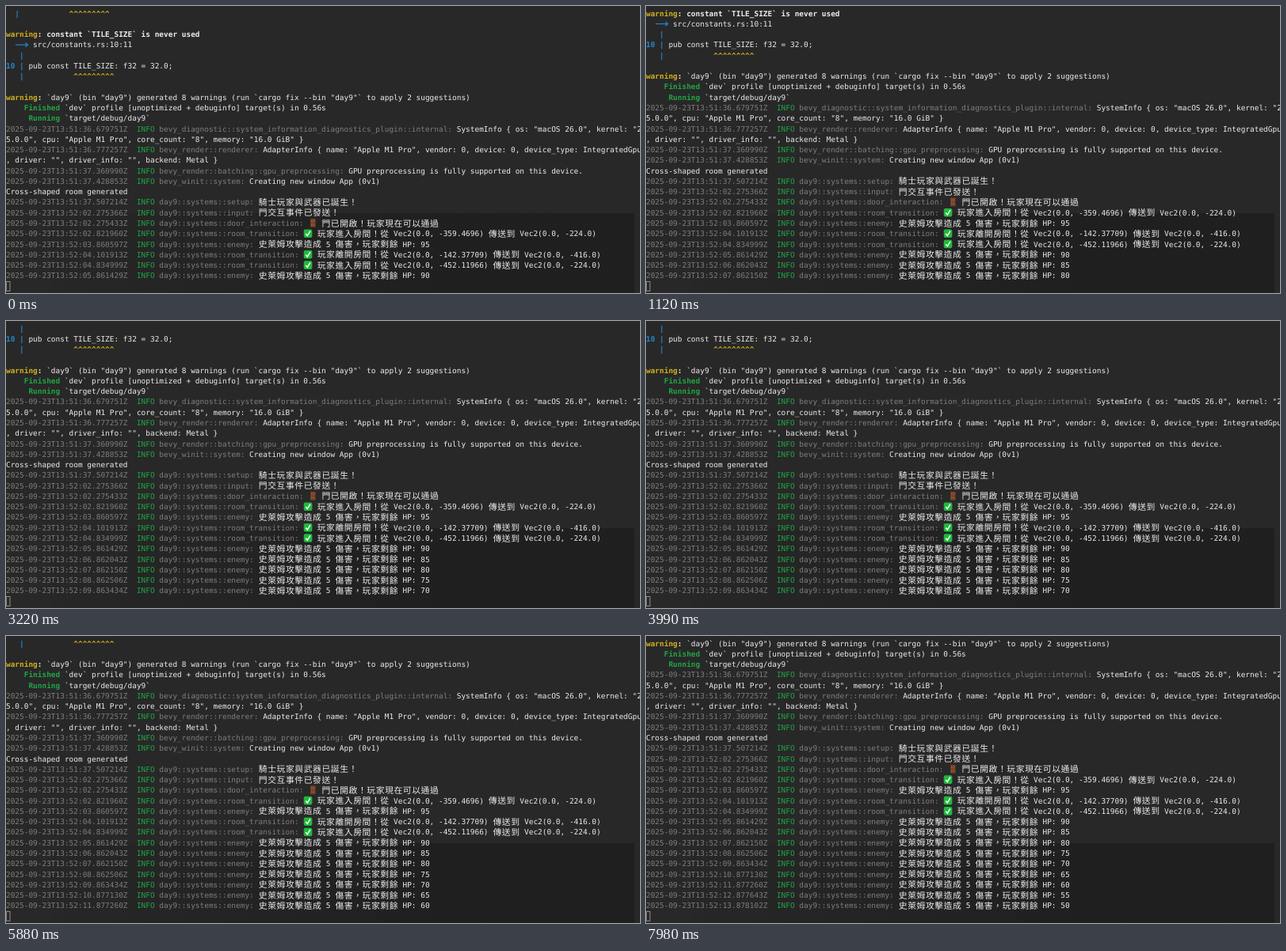
Write an HTML page with a canvas that moves like this. It is 800x363 px and loops after 8000 ms.

```html
<!DOCTYPE html>
<html lang="zh-Hant">
<head>
<meta charset="utf-8">
<title>Terminal log</title>
<style>
  html, body { margin: 0; width: 100%; height: 100%; overflow: hidden; background: #282828; }
  canvas { display: block; width: 100vw; height: 100vh; }
</style>
</head>
<body>
<canvas id="screen" width="800" height="363"></canvas>
<script>
const ctx = document.getElementById('screen').getContext('2d');
const CELL = 5.687, ROW = 13.27, BASELINE = 12.6, COLUMNS = 141, VISIBLE_ROWS = 26;
const LOOP = 8000;
const SCROLL_TIMES = [70, 1120, 2030, 3220, 4270, 5320, 6370, 7210];
const WHITE = '#ececec', DIM = '#7e7e7e', GREEN = '#1fa645', YELLOW = '#d3ae1c', BLUE = '#2388d0';
const LATIN = '9.45px "DejaVu Sans Mono", "Noto Sans Mono", monospace';
const WIDE = '500 10.8px "Noto Sans CJK TC", "Noto Sans CJK", sans-serif';

// A line is a list of [text, colour, bold] spans.
const plain = text => [[text, WHITE]];
const gutter = (text, rest = '', color = WHITE, bold = false) => [[text, BLUE, true], [rest, color, bold]];
const carets = '^'.repeat(9);

function log(time, module, message) {
  return [[`2025-09-23T13:${time}Z  `, DIM], ['INFO ', GREEN], [module + ': ', DIM], [message, WHITE]];
}
const game = (time, module, message) => log('52:' + time, 'day9::systems::' + module, message);
const hit = (time, hp) => game(time, 'enemy', `史萊姆攻擊造成 5 傷害，玩家剩餘 HP: ${hp}`);
const move = (time, verb, from, to) =>
  game(time, 'room_transition', `✅ 玩家${verb}房間！從 Vec2(0.0, ${from}) 傳送到 Vec2(0.0, ${to})`);

const hitTimes = ['05.861429', '06.862043', '07.862150', '08.862506', '09.863434',
                  '10.877130', '11.877260', '12.877643', '13.878102'];

const lines = [
  gutter('  |', ' '.repeat(11) + carets, YELLOW, true),
  [],
  [['warning', YELLOW, true], [': constant `TILE_SIZE` is never used', WHITE, true]],
  gutter('  →', ' src/constants.rs:10:11'),
  gutter('   |'),
  gutter('10 |', ' pub const TILE_SIZE: f32 = 32.0;'),
  gutter('   |', ' '.repeat(11) + carets, YELLOW, true),
  [],
  [['warning', YELLOW, true], [':', WHITE, true],
   [' `day9` (bin "day9") generated 8 warnings (run `cargo fix --bin "day9"` to apply 2 suggestions)', WHITE]],
  [['    Finished', GREEN, true], [' `dev` profile [unoptimized + debuginfo] target(s) in 0.56s', WHITE]],
  [['     Running', GREEN, true], [' `target/debug/day9`', WHITE]],
  log('51:36.679751', 'bevy_diagnostic::system_information_diagnostics_plugin::internal',
      'SystemInfo { os: "macOS 26.0", kernel: "2'),
  plain('5.0.0", cpu: "Apple M1 Pro", core_count: "8", memory: "16.0 GiB" }'),
  log('51:36.777257', 'bevy_render::renderer',
      'AdapterInfo { name: "Apple M1 Pro", vendor: 0, device: 0, device_type: IntegratedGpu'),
  plain(', driver: "", driver_info: "", backend: Metal }'),
  log('51:37.360990', 'bevy_render::batching::gpu_preprocessing',
      'GPU preprocessing is fully supported on this device.'),
  log('51:37.428853', 'bevy_winit::system', 'Creating new window App (0v1)'),
  plain('Cross-shaped room generated'),
  log('51:37.507214', 'day9::systems::setup', '騎士玩家與武器已誕生！'),
  game('02.275366', 'input', '門交互事件已發送！'),
  game('02.275433', 'door_interaction', '🚪 門已開啟！玩家現在可以通過'),
  move('02.821960', '進入', '-359.4696', '-224.0'),
  hit('03.860597', 95),
  move('04.101913', '離開', '-142.37709', '-416.0'),
  move('04.834999', '進入', '-452.11966', '-224.0'),
  ...hitTimes.map((time, i) => hit(time, 90 - 5 * i))
];

function stroke(color, width, points) {
  ctx.strokeStyle = color;
  ctx.lineWidth = width;
  ctx.beginPath();
  points.forEach(([x, y]) => ctx.lineTo(x, y));
  ctx.stroke();
}

// Symbols drawn as shapes: width in cells, and a painter given the left edge and baseline.
const symbols = {
  '→': [3, (x, y) => {
    stroke(BLUE, 1.2, [[x + 0.6, y - 3.3], [x + 16, y - 3.3]]);
    stroke(BLUE, 1.2, [[x + 13, y - 6], [x + 16.2, y - 3.3], [x + 13, y - 0.6]]);
  }],
  '✅': [2, (x, y) => {
    ctx.fillStyle = '#20b83c';
    ctx.beginPath();
    ctx.roundRect(x + 0.4, y - 8.8, 10.6, 10.6, 2);
    ctx.fill();
    stroke('#fff', 1.5, [[x + 2.8, y - 3.2], [x + 4.9, y - 0.7], [x + 8.6, y - 6.6]]);
  }],
  '🚪': [2, (x, y) => {
    ctx.fillStyle = '#6f3d25';
    ctx.fillRect(x + 3, y - 9, 6.6, 10.8);
    ctx.fillStyle = '#8d5233';
    for (const top of [-7.8, -3]) for (const left of [4, 6.6]) ctx.fillRect(x + left, y + top, 1.8, 3.6);
  }]
};

function drawLine(spans, row) {
  const y = BASELINE + row * ROW;
  let column = 0;
  for (const [text, color, bold] of spans) {
    for (const char of text) {
      const x = column * CELL;
      if (symbols[char]) {
        const [width, paint] = symbols[char];
        paint(x, y);
        column += width;
        continue;
      }
      const wide = /[\u2e80-\uffef]/.test(char);
      if (char !== ' ' && column < COLUMNS) {
        ctx.font = wide ? WIDE : (bold ? 'bold ' : '') + LATIN;
        ctx.fillStyle = color;
        ctx.fillText(char, x + (wide ? 0.3 : 0), y + (wide ? 0.5 : 0));
      }
      column += wide ? 2 : 1;
    }
  }
}

function drawBackdrop() {
  ctx.fillStyle = '#282828';
  ctx.fillRect(0, 0, 800, 363);
  const shade = ctx.createLinearGradient(57, 0, 560, 0);
  shade.addColorStop(0, 'rgba(0, 0, 0, 0.03)');
  shade.addColorStop(1, 'rgba(0, 0, 0, 0.22)');
  ctx.fillStyle = shade;
  ctx.fillRect(57, 262, 736, 101);
}

let shown = -1;
function frame() {
  const time = performance.now() % LOOP;
  const scrolled = SCROLL_TIMES.filter(start => start <= time).length;
  if (scrolled !== shown) {
    shown = scrolled;
    drawBackdrop();
    lines.slice(scrolled, scrolled + VISIBLE_ROWS).forEach(drawLine);
    ctx.strokeStyle = '#8c8c8c';
    ctx.lineWidth = 1;
    ctx.strokeRect(0.5, 348.5, 4.5, 12);
  }
  requestAnimationFrame(frame);
}

ctx.textRendering = 'geometricPrecision';
frame();
</script>
</body>
</html>
```
